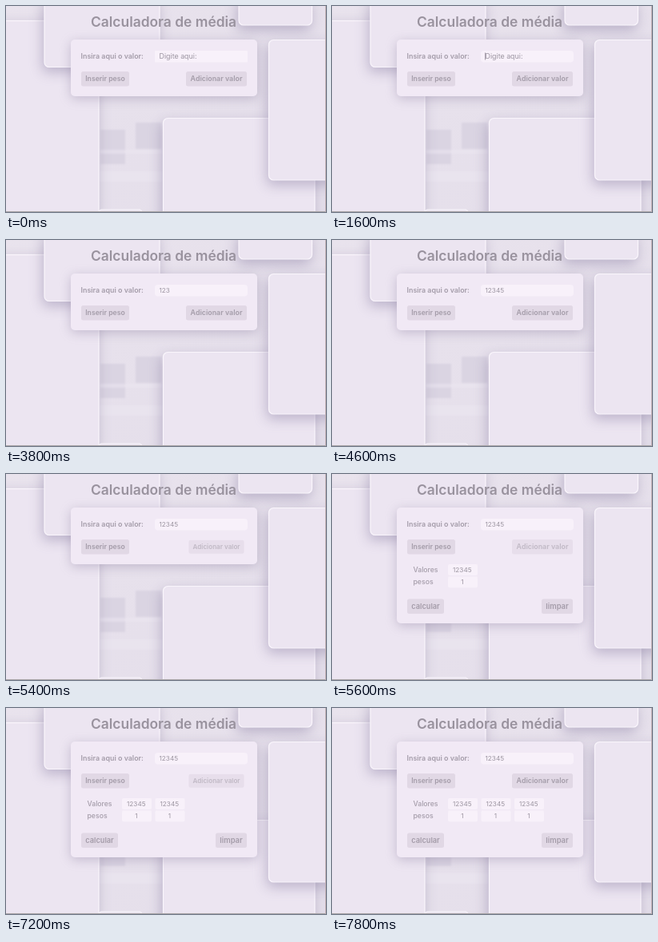
An HTML page for the animation above (8000 ms loop, 400 by 258 pixels).

```html
<!DOCTYPE html>
<html lang="pt-BR">
<head>
<meta charset="utf-8">
<title>Calculadora de média</title>
<style>
  html, body { margin: 0; width: 100%; height: 100%; overflow: hidden; background: #e6e0eb; }
  svg { display: block; width: 100%; height: 100%; }
  text { font: 600 8.9px Inter, sans-serif; fill: #a49ca9; }
  .title { font-size: 17.4px; fill: #99929e; }
  .plain { font-weight: 400; font-size: 8.2px; fill: #9c95a1; }
  .head { font-weight: 500; font-size: 8.7px; }
  .mid { text-anchor: middle; }
  .pane { fill: #ece5f1; stroke: #faf6fc; stroke-width: 1.2; }
  .raised { filter: drop-shadow(-2px 6px 8px rgba(125, 112, 152, .42)); }
  .card { fill: #f1e9f5; filter: drop-shadow(0 3px 7px rgba(125, 112, 148, .36)); }
  .button rect { fill: #e1d8e5; }
  .field { fill: #f8f1fa; }
</style>
</head>
<body>
<svg viewBox="0 0 400 258" preserveAspectRatio="none">
  <defs>
    <linearGradient id="wall" x2="1" y2="1">
      <stop stop-color="#e9e3ed"/>
      <stop offset="1" stop-color="#e4deea"/>
    </linearGradient>
    <filter id="soft"><feGaussianBlur stdDeviation="1.2"/></filter>
  </defs>
  <rect width="400" height="258" fill="url(#wall)"/>
  <g filter="url(#soft)">
    <path d="M118 155h31v43h-31zM162 146h32v33h-32z" fill="#dad4e2"/>
    <path d="M116 180h80v5h-80zM116 207h80v13h-80z" fill="#ece6f1" opacity=".6"/>
  </g>
  <g id="panes"></g>
  <path d="M0 257.5H400" stroke="#aaa6a8"/>
  <path d="M399.5 0V258" stroke="#bcacb0"/>

  <text class="title" x="106" y="25.6">Calculadora de média</text>
  <rect id="card" class="card" x="81" y="42" width="233" height="71" rx="5"/>
  <text x="93.5" y="66">Insira aqui o valor:</text>
  <rect id="field" class="field" x="186" y="56" width="116" height="14.5" rx="3"/>
  <text id="value" class="plain" x="191.5" y="66"></text>
  <path id="caret" d="M191.5 58.5v9" stroke="#8f8795" stroke-width=".8"/>
  <g id="controls"></g>
  <g id="results"></g>
</svg>
<script>
const LOOP = 8000;
const $ = id => document.getElementById(id);

function add(parent, tag, attrs, text = '') {
  const node = document.createElementNS('http://www.w3.org/2000/svg', tag);
  for (const key in attrs) node.setAttribute(key, attrs[key]);
  node.textContent = text;
  return parent.appendChild(node);
}

function addButton(parent, x, y, width, label, size) {
  const group = add(parent, 'g', { class: 'button' });
  add(group, 'rect', { x, y, width, height: 18.5, rx: 2.5 });
  add(group, 'text', { class: 'mid', x: x + width / 2, y: y + 12.3, style: `font-size:${size}px` }, label);
  return group;
}

// x, y, width, height, radius, raised
[
  [-10, 18.5, 126, 260, 0, 1],
  [116, 255, 54, 20, 4, 0],
  [48, -10, 144, 86.5, 6, 1],
  [291, -10, 91.5, 34, 6, 1],
  [196.5, 140.5, 189.5, 130, 6, 1],
  [328.5, 42.5, 90, 175.5, 6, 1],
].forEach(([x, y, width, height, rx, raised]) =>
  add($('panes'), 'rect', { x, y, width, height, rx, class: raised ? 'pane raised' : 'pane' }));

addButton($('controls'), 94, 82, 60, 'Inserir peso', 8.7);
const addValue = addButton($('controls'), 225, 82, 76, 'Adicionar valor', 8.9);

add($('results'), 'text', { class: 'head', x: 101.5, y: 123 }, 'Valores');
add($('results'), 'text', { class: 'head', x: 101.5, y: 138.3 }, 'pesos');
addButton($('results'), 94, 156.5, 46, 'calcular', 9.2);
addButton($('results'), 262, 156.5, 39, 'limpar', 9.4);

const columns = [145, 186.5, 228].map(x => {
  const group = add($('results'), 'g', {});
  ['12345', '1'].forEach((text, row) => {
    const y = 113 + row * 15.3;
    add(group, 'rect', { class: 'field', x, y, width: 37, height: 14, rx: 2 });
    add(group, 'text', { class: 'plain mid', x: x + 17.8, y: y + 10 }, text);
  });
  return group;
});

// [start, value]: each value holds until the next start
const typed = [[0, 0], [3400, 1], [3600, 2], [3800, 3], [4000, 4], [4200, 5]];
const caretOn = [[0, 0], [1400, 1], [2000, 0], [2400, 1], [3000, 0]];
const columnCount = [[0, 0], [5600, 1], [6800, 2], [7400, 3]];
const REST = [1, 1], RELEASED = [1, .62], PRESSED = [.91, .62]; // scale, opacity
const press = [
  [0, REST], [5200, RELEASED], [5400, PRESSED], [5600, RELEASED], [5800, REST],
  [6600, PRESSED], [6800, REST], [7200, PRESSED], [7400, RELEASED], [7600, REST],
];
const at = (steps, time) => steps.findLast(([start]) => start <= time)[1];
const show = (node, on) => { node.style.display = on ? '' : 'none'; };

function draw(time) {
  const count = at(columnCount, time);
  const digits = at(typed, time);
  const [scale, opacity] = at(press, time);

  $('value').textContent = digits ? '12345'.slice(0, digits) : 'Digite aqui:';
  $('value').style.fontSize = digits ? '8.2px' : '8.9px';
  $('field').setAttribute('rx', time < 200 ? 1 : 4);
  show($('caret'), at(caretOn, time));
  $('card').setAttribute('height', count ? 145 : 71);
  show($('results'), count);
  columns.forEach((column, i) => show(column, i < count));
  addValue.setAttribute('transform', `translate(263 91.2) scale(${scale}) translate(-263 -91.2)`);
  addValue.setAttribute('opacity', opacity);
}

const begin = performance.now();
function tick() {
  draw((performance.now() - begin) % LOOP);
  requestAnimationFrame(tick);
}
tick();
</script>
</body>
</html>
```
